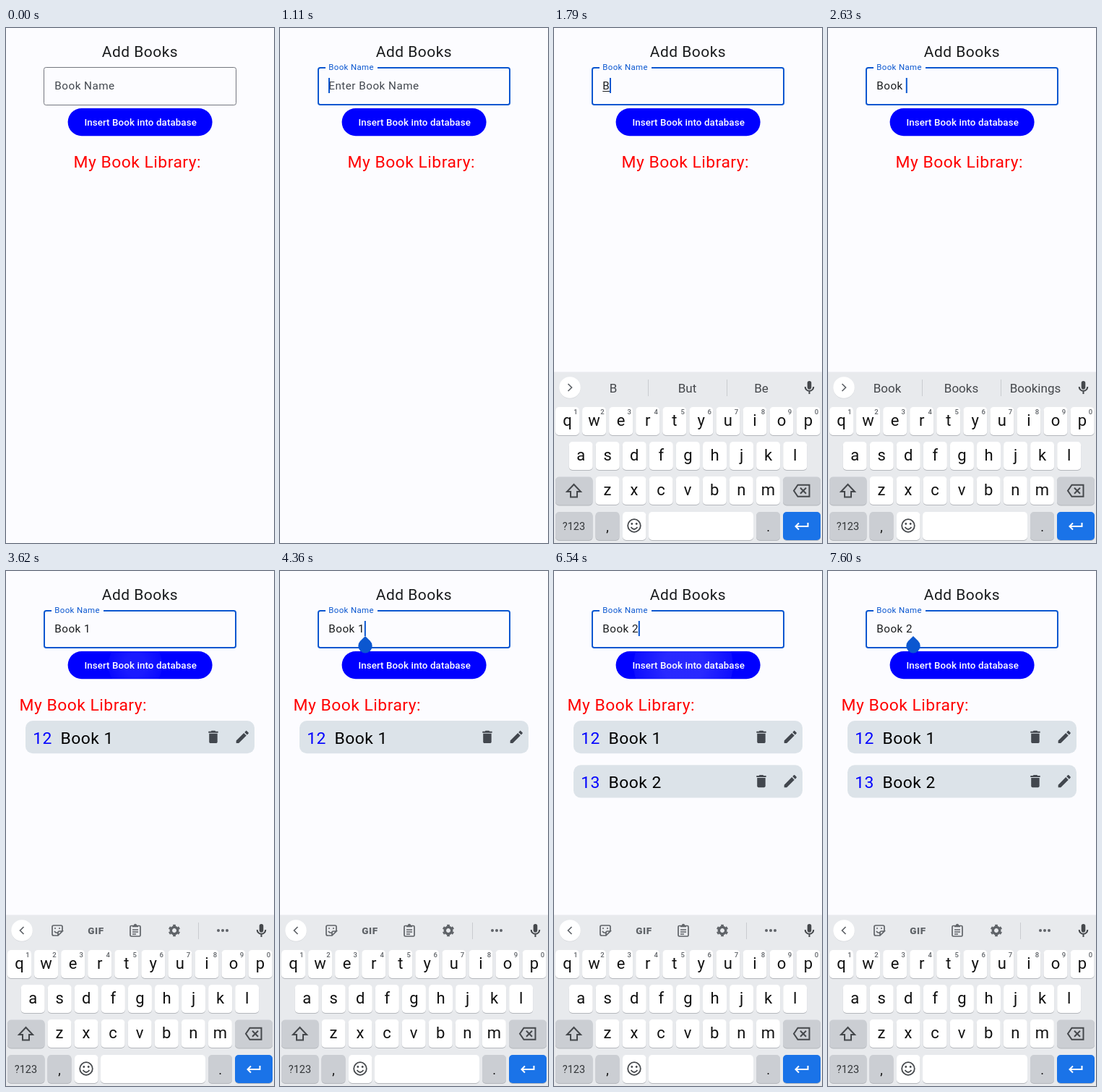
Animation, 371 px wide and 712 px high, one loop 8000 ms. Source, as an HTML page:

```html
<!DOCTYPE html>
<html lang="en">
<head>
<meta charset="utf-8">
<title>Add Books</title>
<style>
html, body { margin: 0; width: 100%; height: 100%; overflow: hidden; background: #fcfcff; }
svg { display: block; width: 100vw; height: 100vh; font-family: Roboto, sans-serif; }
text { white-space: pre; }
.body { font-size: 15.26px; letter-spacing: .477px; }
.large { font-size: 22.88px; letter-spacing: .477px; }
.key { font-size: 22px; text-anchor: middle; fill: #111; }
.mark { font-size: 18px; text-anchor: middle; fill: #111; }
.digit { font-size: 9.5px; font-weight: 500; text-anchor: middle; fill: #5f6368; }
.word { font-size: 17px; text-anchor: middle; fill: #44474b; }
.line { fill: none; stroke: #45484c; stroke-width: 2; }
.tool { fill: none; stroke: #5f6368; stroke-width: 1.7; }
</style>
</head>
<body>
<svg id="stage" viewBox="0 0 371 712" preserveAspectRatio="none">
  <defs>
    <clipPath id="pill"><rect x="85.6" y="111" width="200" height="38.2" rx="19.1"/></clipPath>
    <radialGradient id="glow">
      <stop offset=".4" stop-color="#fff"/><stop offset="1" stop-color="#fff" stop-opacity=".35"/>
    </radialGradient>
  </defs>
  <rect width="371" height="712" fill="#fcfcff"/>
  <text x="132.8" y="40" font-size="20.98" letter-spacing=".477" fill="#1a1c1e">Add Books</text>

  <rect id="border" fill="none"/>
  <rect id="notch" y="52" height="6" fill="#fcfcff"/>
  <text id="label" class="body">Book Name</text>
  <text id="hint" class="body" x="67.3" y="85.2" fill="#42474e">Enter Book Name</text>
  <text id="entry" class="body" x="67.3" y="85.2" fill="#1a1c1e"></text>
  <rect id="underline" x="67.3" y="87" height="1" fill="#1a1c1e"/>
  <rect id="cursor" y="69" width="2" height="21" fill="#0b57d0"/>

  <g clip-path="url(#pill)">
    <rect x="85" y="110" width="202" height="40" fill="#00f"/>
    <circle id="ripple" cx="179" cy="130" fill="url(#glow)"/>
  </g>
  <text x="108.4" y="135.1" font-size="13.35" font-weight="500" letter-spacing=".095" fill="#fff">Insert Book into database</text>
  <path id="handle" d="M118 90l-6.86 6.86a9.7 9.7 0 1 0 13.72 0z" fill="#0b57d0"/>

  <text id="heading" class="large" y="193" fill="#f00">My Book Library:</text>
  <g id="rows"></g>
  <g id="keyboard"></g>
</svg>
<script>
const LOOP = 8000;
const $ = id => document.getElementById(id);
const clamp = v => Math.max(0, Math.min(1, v));
const span = (t, from, length) => clamp((t - from) / length);
const easeOut = p => 1 - (1 - p) ** 3;
const mix = (a, b, p) => a + (b - a) * p;
const show = (id, on) => $(id).setAttribute('visibility', on ? 'visible' : 'hidden');
const set = (id, attrs) => {
  for (const name in attrs) $(id).setAttribute(name, attrs[name]);
};

// Start times of each state
const typing = [
  [0, ''], [1700, 'B'], [2090, 'Bo'], [2260, 'Boo'], [2420, 'Book'],
  [2600, 'Book '], [2790, 'Book 1'], [4880, 'Book '], [5190, 'Book 2']
];
const next = ['for', 'and', 'reviews'];
const strips = [
  [0, null], [1790, ['B', 'But', 'Be']], [2120, ['Bo', 'Book', 'Both']],
  [2290, ['Boo', 'Book', 'Boom']], [2450, ['Book', 'Books', 'Bookings']],
  [2640, next], [3000, []], [3100, null],
  [4880, []], [4920, next], [5430, []], [5530, null]
];
const presses = [3590, 6430];
const fieldTaps = [890, 4215, 7095];
const blinkStarts = [...fieldTaps, ...typing.slice(1).map(s => s[0])];
const at = (steps, t) => steps.filter(s => s[0] <= t).pop()[1];

function row(id, name, y) {
  return `<g id="row${id}" transform="translate(0 ${y})">
    <rect x="27" width="317" height="45.3" rx="10" fill="#dce3e9"/>
    <text class="large" x="37.2" y="32" fill="#00f">${id}</text>
    <text class="large" x="75.5" y="32">${name}</text>
    <g fill="#42474e">
      <path transform="translate(275.5 11) scale(.954)" d="M6 19c0 1.1.9 2 2 2h8c1.1 0 2-.9 2-2V7H6zM19 4h-3.5l-1-1h-5l-1 1H5v2h14z"/>
      <path transform="translate(315.8 11) scale(.954)" d="M3 17.25V21h3.75L17.81 9.94l-3.75-3.75zM20.71 7.04c.39-.39.39-1.02 0-1.41l-2.34-2.34c-.39-.39-1.02-.39-1.41 0l-1.83 1.83 3.75 3.75z"/>
    </g></g>`;
}

function key(x, y, width, fill = '#fff', height = 39) {
  return `<rect x="${x}" y="${y + 1}" width="${width}" height="${height}" rx="5" fill="#b4b7bc"/>
    <rect x="${x}" y="${y}" width="${width}" height="${height}" rx="5" fill="${fill}"/>`;
}

function letters(chars, x, y, digits = '') {
  return [...chars].map((c, i) => {
    const left = x + i * 37.06;
    return key(left, y, 33) +
      `<text class="key letter" x="${left + 16.5}" y="${y + 26.2}">${c}</text>` +
      (digits ? `<text class="digit" x="${left + 28}" y="${y + 10.3}">${digits[i]}</text>` : '');
  }).join('');
}

const icon = (x, y, content, kind = 'line') =>
  `<g class="${kind}" transform="translate(${x} ${y})">${content}</g>`;
const divider = x => `<rect x="${x}" y="486" width="1" height="23" fill="#c9ccd0"/>`;

function toolbar() {
  return icon(71, 497, `<path d="M7 1V-5Q7-7 5-7H-5Q-7-7-7-5V5Q-7 7-5 7H1L7 1H3Q1 1 1 3V7"/>
      <path d="M-4-3h2M2-3h2M-4 1Q-2 4 1 3"/>`, 'tool') +
    `<text x="124.5" y="501.6" font-size="13.5" font-weight="900" letter-spacing=".6" text-anchor="middle" fill="#5f6368">GIF</text>` +
    icon(179, 497, `<rect x="-7" y="-6.5" width="14" height="14.5" rx="1.5"/>
      <path d="M-4-5.5H4M-4-1H4M-4 2H4M-4 5H1"/><circle cy="-7.2" r="1.2"/>`, 'tool') +
    icon(233, 497, `<circle r="4.7" stroke-width="3.4"/>
      <circle r="7.1" stroke-width="2.2" pathLength="12" stroke-dasharray="1 1" stroke-dashoffset="-.5"/>`, 'tool') +
    divider(266) +
    [-6, 0, 6].map(d => `<circle cx="${300 + d}" cy="497" r="2" fill="#5f6368"/>`).join('');
}

function buildKeyboard() {
  const grey = '#cbced3';
  $('keyboard').innerHTML = `
    <rect y="475.5" width="371" height="237" fill="#e8eaed"/>
    <circle cx="22" cy="497.7" r="14.8" fill="#d6d8dc"/><circle cx="22" cy="497" r="14.8" fill="#fff"/>
    <path id="chevron" class="tool" stroke-width="2" d="M-2.5-5L2.5 0L-2.5 5"/>
    <g id="tools">${toolbar()}</g>
    <g id="words">${divider(130)}${divider(239)}${[82, 184.5, 287].map(x =>
      `<text class="word" x="${x}" y="503.5"></text>`).join('')}</g>
    ${icon(353.5, 497, `<rect x="-2.8" y="-9" width="5.6" height="11.5" rx="2.8" fill="#45484c" stroke="none"/>
      <path d="M-5.8-1a5.8 5.8 0 0 0 11.6 0M0 5V9"/>`)}
    ${letters('qwertyuiop', 2, 524, '1234567890')}
    ${letters('asdfghjkl', 20.7, 572)}
    ${key(2, 620.5, 51.5, grey)}${letters('zxcvbnm', 57.5, 620)}${key(317, 620.5, 52, grey)}
    ${icon(27.5, 640, '<path id="shift" d="M0-9L9.5 1H4.5V8.5H-4.5V1H-9.5z"/>')}
    ${icon(343, 639.7, '<path d="M-5.5-8H10.5V8H-5.5L-11 0zM-2-4L6 4M6-4L-2 4"/>')}
    ${key(2, 669, 51.5, grey)}${key(57.5, 669, 33, grey)}${key(95, 669, 32.5)}
    ${key(131, 669, 145)}${key(280, 669, 33, grey)}${key(317, 669, 52, '#1a73e8')}
    <text x="27.5" y="693.7" font-size="14.5" text-anchor="middle" fill="#333639">?123</text>
    <text class="mark" x="74" y="696">,</text>
    <text class="mark" x="296.5" y="696">.</text>
    ${icon(111, 688, `<circle r="8.8" stroke-width="1.8"/><path stroke-width="1.8" d="M-4.5 2Q0 8 4.5 2"/>
      <g fill="#45484c" stroke="none"><circle cx="-3.2" cy="-2.5" r="1.4"/><circle cx="3.2" cy="-2.5" r="1.4"/></g>`)}
    <path d="M351.5 684V689H334.5M339 684.5L334.5 689L339 693.5" fill="none" stroke="#fff" stroke-width="2"/>`;
}

function drawField(t) {
  const focus = easeOut(span(t, 900, 150));
  const value = at(typing, t);
  const inset = mix(.5, 1, focus);
  set('border', {
    x: 52 + inset, y: 54 + inset, width: 267 - 2 * inset, height: 53 - 2 * inset, rx: 2.8,
    'stroke-width': 2 * inset,
    stroke: `rgb(${mix(116, 11, focus)},${mix(119, 87, focus)},${mix(127, 208, focus)})`
  });
  set('notch', { x: 99 - 36 * focus, width: 72 * focus });
  set('label', {
    fill: `rgb(${mix(66, 11, focus)},${mix(71, 87, focus)},${mix(78, 208, focus)})`,
    transform: `translate(67.3 ${mix(85.2, 58.3, focus)}) scale(${mix(1, .75, focus)})`
  });
  set('hint', { opacity: value ? 0 : span(t, 980, 80) });

  $('entry').textContent = value;
  const width = value ? $('entry').getComputedTextLength() : 0;
  const lastReset = Math.max(0, ...blinkStarts.filter(s => s <= t));
  show('cursor', t >= 900 && Math.floor((t - lastReset) / 500) % 2 === 0);
  set('cursor', { x: 67 + width });
  set('underline', { width });
  show('underline', t >= 1700 && t < 2600);
  show('handle', (t >= fieldTaps[1] && t < 4880) || t >= fieldTaps[2]);
}

function drawLibrary(t) {
  const start = presses.filter(s => s <= t).pop();
  const age = start === undefined ? LOOP : t - start;
  set('ripple', {
    r: mix(22, 110, easeOut(span(age, 0, 500))),
    opacity: .16 * span(age, -20, 80) * (1 - span(age, 260, 180))
  });
  set('heading', { x: t < presses[0] + 20 ? 93.6 : 18.6 });
  show('row12', t >= presses[0] + 20);
  show('row13', t >= presses[1] + 20);
}

function drawKeyboard(t) {
  show('keyboard', t >= 1130);
  set('keyboard', { transform: `translate(0 ${236.5 * (1 - easeOut(span(t, 1110, 213)))})` });
  const caps = t >= 1340 && t < 1730;
  document.querySelectorAll('.letter').forEach(el => {
    el.textContent = caps ? el.textContent.toUpperCase() : el.textContent.toLowerCase();
  });
  set('shift', { fill: caps ? '#45484c' : 'none' });

  const words = at(strips, t);
  set('chevron', { transform: `translate(22 497) scale(${words ? 1 : -1} 1)` });
  set('tools', { display: words ? 'none' : 'inline' });
  set('words', { display: words && words.length ? 'inline' : 'none' });
  document.querySelectorAll('.word').forEach((el, i) => {
    el.textContent = words && words[i] || '';
  });
}

$('rows').innerHTML = row(12, 'Book 1', 207) + row(13, 'Book 2', 268.2);
buildKeyboard();

const begin = performance.now();
function frame() {
  const t = (performance.now() - begin) % LOOP;
  drawField(t);
  drawLibrary(t);
  drawKeyboard(t);
  requestAnimationFrame(frame);
}
frame();
</script>
</body>
</html>
```
